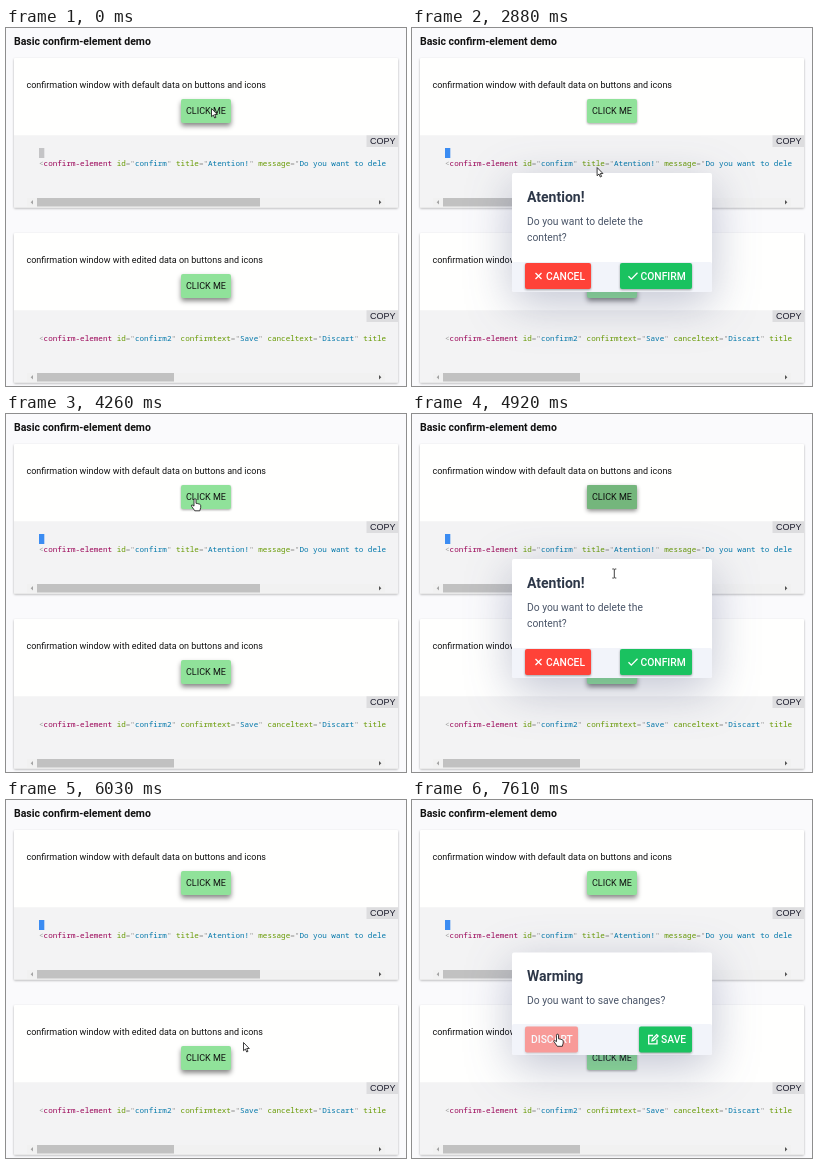
These frames come from a looping animation (400x358 px, 8 s). An HTML page:

```html
<!DOCTYPE html>
<html lang="en">
<head>
<meta charset="utf-8">
<title>confirm-element demo</title>
<style>
  html, body { margin: 0; width: 100%; height: 100%; overflow: hidden; background: #fafafc; }
  #stage { display: block; width: 100vw; height: 100vh; font-family: Roboto, sans-serif; }
  text { white-space: pre; }
  .title { font-size: 10.5px; font-weight: 700; fill: #111; }
  .card { fill: #fffffe; filter: drop-shadow(0 1px 1px rgba(0,0,0,.3)); }
  .body { font-size: 9px; fill: #111; }
  .copy { font: 9px "Liberation Sans", Arial, sans-serif; fill: #1c1c2c; }
  .code { font: 7.61px "Noto Sans Mono", monospace; fill: #999; }
  .tag { fill: #990055; }
  .attr { fill: #669900; }
  .value { fill: #0077aa; }
  .panel { fill: #fff; filter: drop-shadow(0 12px 23px rgba(50,60,110,.3)); }
  .heading { font-size: 14px; font-weight: 700; fill: #2d3748; }
  .message { font-size: 10.3px; fill: #4a5568; }
  .action text { font-size: 10.3px; font-weight: 500; fill: #fff; }
  .action rect { filter: drop-shadow(0 1.2px 1.2px rgba(0,0,0,.35)); }
  .icon { fill: none; stroke: #fff; stroke-width: 1.3; }
  .pointer { fill: #fff; stroke: #111; stroke-width: .8; stroke-linejoin: round; }
</style>
</head>
<body>
<svg id="stage" viewBox="0 0 400 358" preserveAspectRatio="none"></svg>
<script>
const LOOP = 8000;
const RED = '#ff4238', GREEN = '#1ac260';
const $ = id => document.getElementById(id);

const buttons = {
  open1: { x: 175, y: 71, w: 50, h: 24 },
  open2: { x: 175, y: 246, w: 50, h: 24 },
  cancel: { x: 113, y: 235, w: 66, h: 26, dialog: 'deleteDialog' },
  confirm: { x: 208, y: 235, w: 72, h: 26, dialog: 'deleteDialog' },
  discard: { x: 113, y: 226.5, w: 53, h: 26, dialog: 'saveDialog' },
  save: { x: 227, y: 226.5, w: 53, h: 26, dialog: 'saveDialog' }
};
const dialogs = {
  deleteDialog: { x: 100, y: 145, w: 200, h: 119, footer: 30, opener: 'open1' },
  saveDialog: { x: 100, y: 152.5, w: 200, h: 102.5, footer: 31, opener: 'open2' }
};

// The whole session: pointer moves [start, end, x, y] and clicks [time, button]
const start = { x: 205.5, y: 80.5 };
const moves = [
  [880, 1000, 197.5, 85],
  [2730, 3150, 155, 272], [3150, 3340, 153, 246],
  [3850, 4260, 189, 84.5],
  [4740, 4920, 202.3, 159.5], [4920, 5300, 237.5, 242.5],
  [6030, 6300, 210.5, 255],
  [6950, 7340, 169, 243], [7380, 7610, 145.5, 234]
];
const clicks = [[2110, 'open1'], [3650, 'cancel'], [4720, 'open1'], [5570, 'confirm'], [6570, 'open2']];

// Drawing helpers
const rect = ({ x, y, w, h }, attrs) =>
  `<rect x="${x}" y="${y}" width="${w}" height="${h}" ${attrs}/>`;
const box = (x, y, w, h, attrs) => rect({ x, y, w, h }, attrs);
const label = (x, y, cls, str) => `<text x="${x}" y="${y}" class="${cls}">${str}</text>`;
const span = (cls, str) => `<tspan class="${cls}">${str}</tspan>`;

const ripple = (id, color) => {
  const { x, y, w, h } = buttons[id];
  return `<svg x="${x}" y="${y}" width="${w}" height="${h}" overflow="hidden">
    <circle id="${id}Ripple" fill="${color}" opacity="0"/></svg>`;
};

const codeLine = (y, attrs) => `
  <svg x="33" y="${y - 10}" width="347" height="14" overflow="hidden">
    <text x="0" y="10" class="code">&lt;${span('tag', 'confirm-element')}${
      attrs.map(([name, value]) => ` ${span('attr', name)}="${span('value', value)}"`).join('')
    }&gt;</text></svg>`;

const demo = (id, top, caption, attrs, thumb) => {
  const code = top + 77.3, bar = top + 140, mid = bar + 4;
  return box(8, top, 384, 149.5, 'class="card" rx="1"')
    + label(20.5, top + 30, 'body', caption)
    + box(8, code, 384, 72.2, 'fill="#f3f3f4"')
    + box(360.5, code, 31.5, 11.7, 'fill="#dddddf"')
    + label(364, code + 9, 'copy', 'COPY')
    + codeLine(top + 108, attrs)
    + box(21, bar, 358, 8.5, 'fill="#f1f1f1"')
    + box(31, bar, thumb, 8.5, 'fill="#c1c1c1"')
    + `<path d="M27 ${mid - 2}v4.4l-2.3-2.2z" fill="#a3a3a3"/>`
    + `<path d="M373 ${mid - 2}v4.4l2.3-2.2z" fill="#505050"/>`
    + rect(buttons[id], `id="${id}" fill="#90e29a" rx="2"`)
    + label(180, top + 56.3, 'body', 'CLICK ME')
    + ripple(id, '#000');
};

const action = (id, color, textX, str, icon = '') => `
  <g id="${id}" class="action">${rect(buttons[id], `fill="${color}" rx="2"`)}
    <path class="icon" d="${icon}"/>${label(textX, buttons[id].y + 16.8, '', str)}</g>
  ${ripple(id, '#fff')}`;

const dialog = (id, heading, lines, ...actions) => {
  const d = dialogs[id];
  return `<g id="${id}" opacity="0">
    ${rect(d, 'class="panel" rx="2"')}
    ${box(d.x, d.y + d.h - d.footer, d.w, d.footer, 'fill="#f2f4fa" rx="2"')}
    ${label(115, d.y + 28.5, 'heading', heading)}
    ${lines.map((line, i) => label(115, d.y + 51.5 + 16.2 * i, 'message', line)).join('')}
    ${actions.join('')}</g>`;
};

$('stage').innerHTML = box(0, 0, 400, 358, 'fill="#fafafc"')
  + label(8, 16.5, 'title', 'Basic confirm-element demo')
  + demo('open1', 30, 'confirmation window with default data on buttons and icons',
      [['id', 'confirm'], ['title', 'Atention!'], ['message', 'Do you want to delete the content?']], 223)
  + box(33, 120, 5.3, 10, 'id="selection"')
  + demo('open2', 205, 'confirmation window with edited data on buttons and icons',
      [['id', 'confirm2'], ['confirmtext', 'Save'], ['canceltext', 'Discart'], ['title', 'Warming']], 137)
  + dialog('deleteDialog', 'Atention!', ['Do you want to delete the', 'content?'],
      action('cancel', RED, 134, 'CANCEL', 'M123.5 245l6 6m0-6l-6 6'),
      action('confirm', GREEN, 228.5, 'CONFIRM', 'M216.5 248.3l2.8 2.8 6.2-6.4'))
  + dialog('saveDialog', 'Warming', ['Do you want to save changes?'],
      action('discard', RED, 119, 'DISCART'),
      action('save', GREEN, 249, 'SAVE',
        'M241 235.5h-4.3v8.3h8.3v-4.3M240 240.8l.3-1.8 4.4-4.4 1.4 1.4-4.4 4.4z'))
  + `<g id="pointer" class="pointer">
      <path id="hand" d="M-1 1.2a1 1 0 0 1 2 0V4.8l1.7.3 2 .6q1 .4 1 1.4v2l-.9 3.2h-5l-3.3-4.6q-.5-1.2.6-1.3L-1 7.6z"/>
      <path id="arrow" d="M0 0v8.2l1.9-1.7 1.3 3 1.3-.6-1.3-2.9h2.6z"/>
      <path id="beam" fill="none" d="M-2-4.5h1.4l.6.5.6-.5H2M0-4v8M-2 4.5h1.4l.6-.5.6.5H2"/>
    </g>`;

// Everything below depends on the time alone
const ramp = (t, from, to) => Math.min(1, Math.max(0, (t - from) / (to - from)));
const smooth = p => p * p * (3 - 2 * p);
const inside = (p, b) => p.x >= b.x && p.x <= b.x + b.w && p.y >= b.y && p.y <= b.y + b.h;

function pointerAt(t) {
  let { x, y } = start;
  for (const [from, to, toX, toY] of moves) {
    const p = smooth(ramp(t, from, to));
    x += (toX - x) * p;
    y += (toY - y) * p;
  }
  return { x, y };
}

function visibility(id, t) {
  let shown = 0;
  for (const [time, button] of clicks) {
    if (button === dialogs[id].opener) shown += ramp(t - time, 40, 200);
    if (buttons[button].dialog === id) shown -= ramp(t - time, 120, 270);
  }
  return shown;
}

// The button or dialog under the pointer
function targetAt(t) {
  const p = pointerAt(t);
  const open = Object.keys(dialogs).find(id => visibility(id, t) > .5 && inside(p, dialogs[id]));
  return Object.keys(buttons).find(id => buttons[id].dialog === open && inside(p, buttons[id])) || open;
}

function shapeAt(t) {
  const target = targetAt(t);
  if (t < moves[0][0] || !target) return 'arrow';
  if (buttons[target]) return 'hand';
  const { y, h, footer } = dialogs[target];
  return pointerAt(t).y < y + h - footer ? 'beam' : 'arrow';
}

// Each click on an opener flips it between raised and flat
function flatness(id, t) {
  return clicks.filter(c => c[1] === id)
    .reduce((flat, [time], i) => flat + (i % 2 ? -1 : 1) * ramp(t - time, 0, 250), 0);
}

function drawRipple(id, t) {
  const click = clicks.findLast(c => c[1] === id && c[0] <= t);
  const age = click ? t - click[0] : LOOP;
  const circle = $(id + 'Ripple');
  circle.setAttribute('opacity', .28 * (1 - ramp(age, 170, 270)));
  if (!click) return;
  const { x, y } = pointerAt(click[0]);
  circle.setAttribute('cx', x - buttons[id].x);
  circle.setAttribute('cy', y - buttons[id].y);
  circle.setAttribute('r', 14 + .205 * age);
}

function draw(t) {
  const { x, y } = pointerAt(t);
  $('pointer').setAttribute('transform', `translate(${x} ${y})`);
  const shape = shapeAt(t);
  for (const id of ['hand', 'arrow', 'beam']) $(id).setAttribute('opacity', +(id === shape));

  $('selection').setAttribute('fill', t < clicks[0][0] ? '#c4c4c6' : '#3b8cf2');
  for (const id in dialogs) $(id).setAttribute('opacity', visibility(id, t));

  const recent = Array.from({ length: 6 }, (_, i) => targetAt(t - i * 20));
  for (const id in buttons) {
    drawRipple(id, t);
    if (buttons[id].dialog) {
      const hover = recent.filter(target => target === id).length / recent.length;
      $(id).setAttribute('opacity', 1 - hover / 2);
    } else {
      const height = 1 - flatness(id, t);
      $(id).style.filter =
        `drop-shadow(0 ${1 + 2 * height}px ${1 + 1.6 * height}px rgba(0,0,0,${.35 + .12 * height}))`;
    }
  }
}

let begin;
function frame(now) {
  begin ??= now;
  draw((now - begin) % LOOP);
  requestAnimationFrame(frame);
}
draw(0);
requestAnimationFrame(frame);
</script>
</body>
</html>
```
